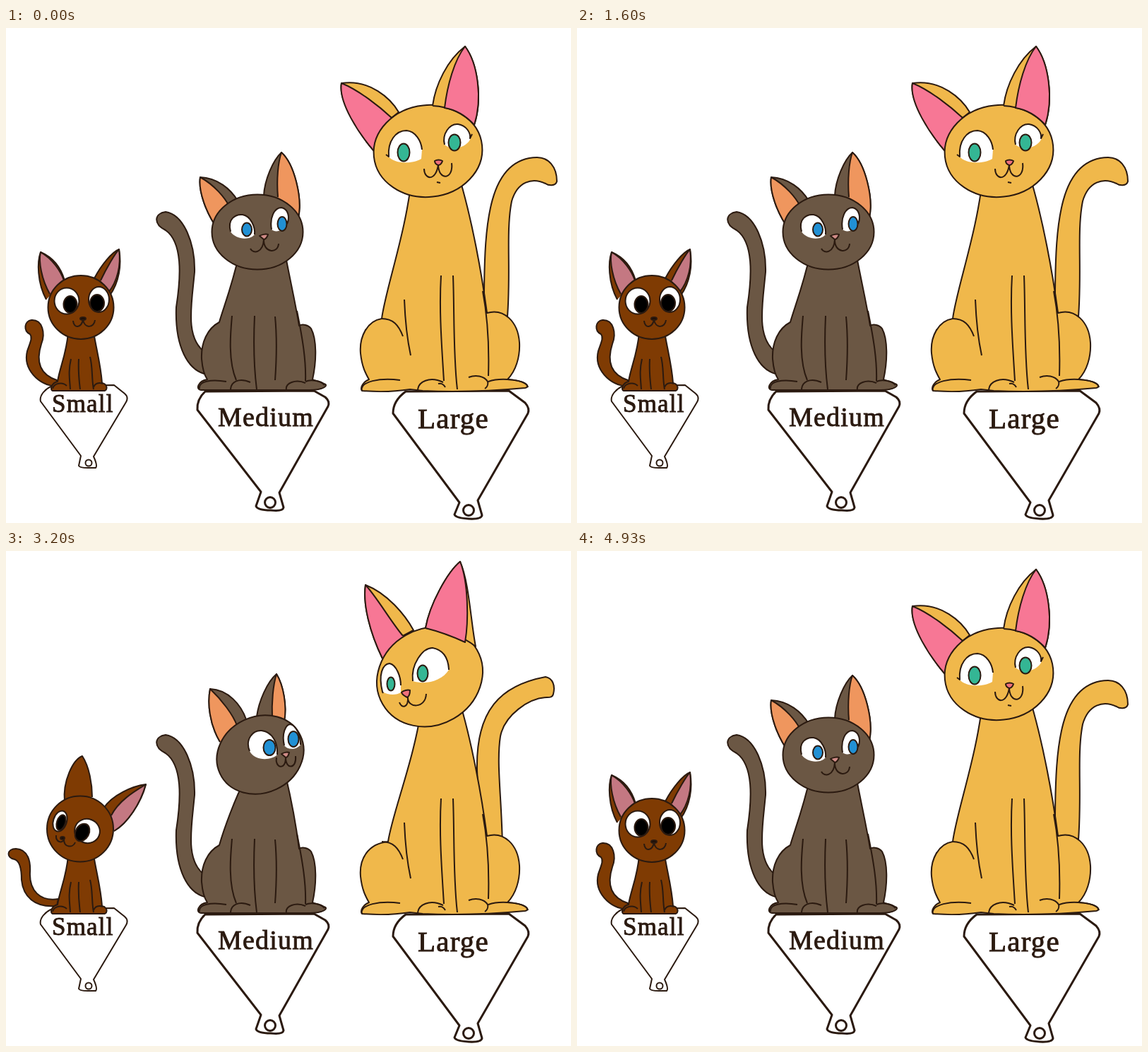
An HTML page for the animation above (5000 ms loop, 800 px wide and 700 px high).

```html
<!DOCTYPE html>
<html lang="en">
<head>
<meta charset="utf-8">
<title>Three cats</title>
<style>
html, body { margin: 0; width: 100%; height: 100%; overflow: hidden; background: #fff; }
svg { display: block; width: 800px; height: 700px; }
path { stroke: #2b1a10; stroke-linejoin: round; }
text { font-family: "Liberation Serif", Times, serif; letter-spacing: 1.2px; fill: #2b1a10; stroke: #2b1a10; stroke-width: .9px; }
</style>
</head>
<body>
<svg id="stage" viewBox="0 0 800 700"></svg>
<script>
const stage = document.getElementById('stage');
const number = /-?[\d.]+/g;
const morphs = [];
let layer = stage;

function add(tag, attrs, parent = layer) {
  const el = document.createElementNS('http://www.w3.org/2000/svg', tag);
  for (const key in attrs) el.setAttribute(key, attrs[key]);
  return parent.appendChild(el);
}

// A path that blends from shape a to shape b; both use the same commands
function shape(fill, a, b = a, width = 2) {
  const el = add('path', { d: a, fill, 'stroke-width': width });
  if (a !== b) morphs.push({ el, a, ends: b.match(number) });
}
const line = (a, b) => shape('none', a, b);

// Ellipse from four cubic curves, so that turned ones blend cleanly
function oval(cx, cy, rx, ry, turn = 0) {
  const r = turn * Math.PI / 180, c = Math.cos(r), s = Math.sin(r), k = .5523;
  const p = (u, v) => `${(cx + u * rx * c - v * ry * s).toFixed(1)} ${(cy + u * rx * s + v * ry * c).toFixed(1)}`;
  const quarter = (u, v) => `C${p(u - v * k, v + u * k)} ${p(u * k - v, v * k + u)} ${p(-v, u)}`;
  return `M${p(-1, 0)}${quarter(-1, 0)}${quarter(0, -1)}${quarter(1, 0)}${quarter(0, 1)}Z`;
}

// White of the eye has a drawn upper lid and a soft lower edge
function eye(color, lidA, lowA, lidB, lowB, irisA, irisB) {
  shape('#fff', lidA + lowA, lidB + lowB, 0);
  line(lidA, lidB);
  shape(color, oval(...irisA), oval(...irisB));
}

function stake(d, x, y, r, width, label, tx, ty, size) {
  shape('#fff', d, d, width);
  shape('#fff', oval(x, y, r, r), undefined, width);
  add('text', { x: tx, y: ty, 'font-size': size }).textContent = label;
}

stake('M66 506C55 510 47 520 49 528L106 605L103 619Q104 622 116 622L127 622Q130 619 124 606L170 529Q174 522 168 517L153 505Z',
  117, 615, 4.5, 2, 'Small', 65, 543, 35);
stake('M282 514Q270 525 271 540L361 656L354 676Q356 682 375 682Q392 684 393 678L387 657L456 535Q459 528 452 522L436 513Z',
  374, 671, 7.5, 3, 'Medium', 300, 563, 38);
stake('M566 514Q548 527 548 545L642 671L635 688Q637 693 655 694Q673 695 674 689L668 668L739 545Q742 538 735 530L712 513Z',
  655, 682, 7.5, 3, 'Large', 583, 566, 41);

// Small cat
const brown = '#7f3b03', rose = '#c47882';
shape(brown, 'M72 507C45 505 24 482 30 457C34 445 38 438 34 433C24 428 26 414 36 413C52 412 56 432 50 447C42 472 48 490 72 498Z',
  'M72 502C40 505 24 488 22 465C22 448 19 438 12 436C0 434 1 421 14 421C32 422 35 440 34 455C33 480 48 496 74 492Z');
shape(brown, 'M88 430C86 460 76 480 73 500C64 502 62 512 66 513L140 513C145 510 142 503 136 502C134 475 128 455 124 430Z');
line('M92 468C88 485 90 495 91 511M103 468C102 485 103 495 105 511M119 465C123 480 121 495 124 511M66 510C68 502 80 500 86 506M124 508C126 502 132 501 137 503');
shape(brown, 'M57 384C44 360 44 330 49 317C68 325 78 340 83 357', 'M83 355C80 325 95 295 108 290C118 305 122 330 122 348');
shape(rose, 'M62 376C50 355 46 330 49 317C66 326 78 345 82 357', 'M108 300C108 300 108 300 108 300C108 300 108 300 108 300');
shape(brown, 'M125 354C135 335 150 317 160 313C164 335 160 360 147 378', 'M138 364C150 345 180 332 198 330C192 355 172 385 153 396');
shape(rose, 'M134 357C142 340 155 318 160 313C163 335 158 358 145 374', 'M149 374C160 352 185 338 198 330C190 358 172 385 153 396');
shape(brown, oval(106, 395, 46.5, 45), oval(105, 393, 47, 46.5));
shape('#fff', oval(86, 386, 17.5, 18.5), oval(76.5, 382, 9.5, 15, 18));
shape('#fff', oval(131.5, 384, 14.5, 18), oval(115, 396, 18, 17, 20));
shape('#000', oval(91, 391, 9.5, 12), oval(78, 384, 6, 11, 18));
shape('#000', oval(129, 389, 10, 12), oval(108, 398, 9.5, 13, 28));
shape('#1c0d05', oval(109, 411, 4, 2), oval(80, 406, 3, 2));
line('M95 414C96 426 107 424 109 412C111 426 125 424 126 413', 'M71 402C70 412 80 414 82 408C82 420 95 420 98 412');

// Medium cat
const taupe = '#6b5744', apricot = '#ef965e', blue = '#2190d4';
shape(taupe, 'M285 490C257 485 239 450 241 395C248 350 250 303 226 286C208 277 210 262 226 260C252 264 268 305 267 345C263 390 252 440 284 460Z');
const mediumRest = 'C285 425 276 445 277 468C278 480 280 490 285 497C272 499 268 511 276 512L430 512C450 512 458 505 450 503C446 499 436 499 434 497C440 470 440 440 432 425C428 420 420 418 415 421';
shape(taupe, 'M330 320C320 365 308 395 302 416' + mediumRest + 'C410 390 403 360 395 318Z',
  'M340 320C324 350 308 395 302 416' + mediumRest + 'C411 390 406 360 396 318Z');
line('M320 407C318 430 314 470 326 498M352 407C350 450 351 480 355 511M381 408C384 440 383 470 381 498M412 400C420 440 425 470 424 499');
line('M274 510C272 500 290 496 312 500M318 512C318 500 330 494 346 501M397 512C395 502 410 496 424 502M424 500C432 496 446 499 451 505');
shape(taupe, 'M301 286C283 262 272 230 275 211C300 212 318 228 328 244', 'M303 270C288 245 285 215 289 195C315 196 333 218 340 238');
shape(apricot, 'M301 286C283 262 272 230 275 211C295 222 310 240 316 252', 'M303 270C288 245 285 215 289 195C305 210 322 232 327 247');
shape(taupe, 'M365 237C366 215 378 187 390 176C408 192 420 240 414 268', 'M355 234C358 212 370 185 383 174C393 190 398 220 394 240');
shape(apricot, 'M385 239C383 215 385 190 390 176C408 192 420 240 414 268', 'M377 236C376 215 378 190 383 174C393 190 398 220 394 241');
shape(taupe, oval(356, 288.5, 64.5, 53), oval(360, 288, 63, 54, -25));
eye(blue, 'M318 288C313 270 325 263 335 264C347 266 353 282 352 292', 'C345 301 325 299 318 288Z',
  'M345 283C338 266 350 253 362 254C378 256 385 272 384 288', 'C375 297 352 297 345 283Z',
  [341, 285, 7, 9.5], [373, 278, 8.5, 11]);
eye(blue, 'M376 285C373 268 380 254 390 254C400 256 402 268 398 277', 'C392 287 382 290 376 285Z',
  'M394 275C390 258 396 245 403 245C412 248 417 262 417 274', 'C413 280 400 283 394 275Z',
  [391, 277, 6.5, 10], [407, 266, 7.5, 11]);
shape('#d08c88', 'M359 294C362 292 368 291 371 292C370 296 367 299 365 299Z', 'M390 287C393 285 398 284 401 285C400 289 398 292 396 292Z');
line('M346 312C350 320 364 318 365 299C364 318 385 320 386 305', 'M383 292C380 306 396 312 396 292C396 310 412 308 410 290');

// Large cat
const gold = '#f0b84b', pink = '#f77795', green = '#34b694';
shape(gold, 'M677 420L677 372C678 280 682 184 752 183C768 183 780 196 780 217C778 224 768 223 764 220C745 211 724 217 716 245C707 290 716 350 709 420',
  'M672 420L667 310C665 225 700 190 764 178C774 180 778 190 775 202C774 207 770 207 766 207C740 208 706 232 700 262C694 300 702 350 703 420');
const largeRest = 'C512 414 500 436 502 460C504 480 510 490 514 497C506 500 501 508 504 513Q540 516 572 511L590 513Q660 516 735 509C743 508 736 498 710 497C722 485 728 465 727 445C725 415 705 396 681 403C674 350 660 270 640 205Z';
shape(gold, 'M575 205C568 285 537 370 532 411' + largeRest, 'M589 215C580 290 547 370 541 411' + largeRest);
line('M532 411C548 411 556 420 562 436M564 384C565 410 568 440 573 463M616 350C613 400 617 450 620 499M633 350C635 400 633 460 639 511M675 372C684 420 684 460 683 492');
line('M504 513C500 500 530 494 558 498M583 513C583 500 600 492 619 501M612 503C616 502 620 504 622 508M655 494C665 490 677 492 682 500C683 504 681 508 678 510M683 500C700 494 738 497 739 508');
const largeHead = layer = add('g', {});
shape(gold, 'M521 174C505 155 470 105 475 78C515 72 545 100 556 119L546 127', 'M533 152C515 115 505 75 509 48C540 60 565 90 577 112L562 120');
shape(pink, 'M521 174C500 150 470 105 475 78C500 88 530 112 546 127', 'M533 152C515 115 505 75 509 48C525 65 545 100 562 120');
shape(gold, oval(597.5, 174, 77, 65, -6), oval(600, 178, 77, 68, -30));
shape(gold, 'M604 110C608 80 625 45 650 26C668 50 675 100 663 137Q640 112 604 110', 'M594 109C600 75 625 30 643 15C656 45 658 100 665 135Q640 115 594 109');
shape(pink, 'M621 113C625 80 635 45 650 26C668 50 675 100 663 137Q645 117 621 113Z', 'M594 109C600 75 625 30 643 15C655 45 655 100 650 129Q622 116 594 109Z');
eye(green, 'M538 179L542 182C540 160 552 145 567 145C580 146 588 160 589 172', 'L588 185C575 193 550 192 542 182Z',
  'M534 201L533 199C527 175 533 160 543 159C553 161 559 178 559 190', 'L559 200C553 204 541 204 533 199Z',
  [563, 176, 8.5, 12.5], [545, 188, 5.5, 9.5]);
eye(green, 'M621 165C617 150 628 135 640 136C652 138 658 148 657 156L660 150', 'L657 158C650 170 632 174 621 165Z',
  'M576 184C573 160 590 137 604 137C620 140 626 152 627 167L627 168', 'L627 168C618 183 595 190 576 184Z',
  [635, 162, 8.5, 11.5], [590, 173, 7.5, 11.5]);
shape('#f0707c', 'M607 188C610 186 615 186 618 188C617 192 614 194 612 194C609 193 607 191 607 188Z',
  'M560 200C563 197 569 196 572 197C572 202 570 206 568 207C564 205 561 203 560 200Z');
line('M592 199C592 214 608 218 612 194C613 217 634 214 631 191', 'M557 214C560 223 570 222 569 207C568 222 594 224 595 202');
line('M610 218L615 219', 'M578 228L578 228');

// Front pose, turned pose, and the longer rest halfway between them
const blend = { front: 0, turned: 1, rest: .5 };
const schedule = {
  front: [0, 600, 1000, 1600, 2300, 2800, 3300, 4400, 4930],
  turned: [100, 500, 1100, 1500, 1800, 2200, 2700, 3200, 3900, 4830],
  rest: [200, 700, 1200, 1900, 2400, 2900, 3500, 4000, 4500]
};
const cues = Object.entries(schedule)
  .flatMap(([pose, times]) => times.map(time => ({ time, pose })))
  .sort((a, b) => b.time - a.time);
let shown;

function setPose(pose) {
  if (pose === shown) return;
  shown = pose;
  const k = blend[pose];
  for (const { el, a, ends } of morphs) {
    let i = 0;
    el.setAttribute('d', a.replace(number, n => ' ' + (n * (1 - k) + ends[i++] * k)));
  }
  largeHead.setAttribute('transform', `translate(0 ${pose === 'rest' ? -9 : 0})`);
}

const start = performance.now();
function draw(now) {
  const t = Math.max(0, now - start) % 5000;
  setPose(cues.find(cue => cue.time <= t).pose);
  requestAnimationFrame(draw);
}
draw(start);
</script>
</body>
</html>
```
